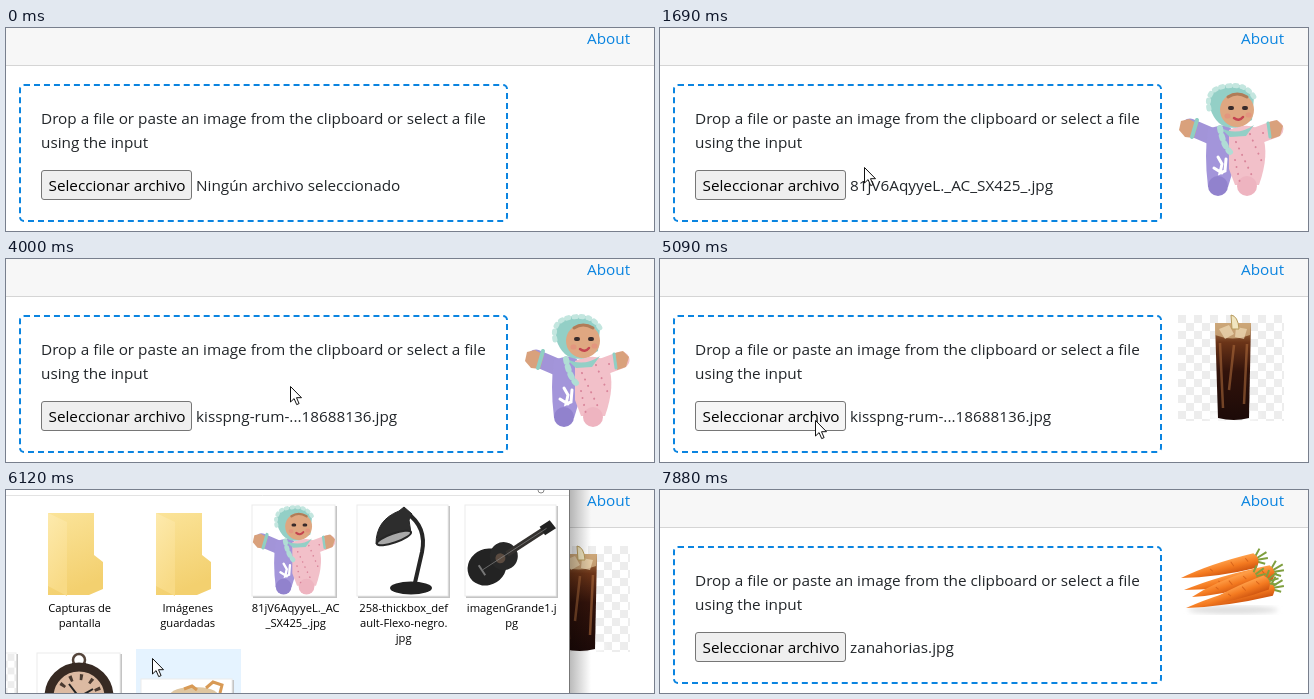
Recreate the animation shown at these times as an HTML page. Size 648x203 px, loop 8600 ms.

```html
<!DOCTYPE html>
<html lang="es">
<head>
<meta charset="utf-8">
<title>File drop</title>
<style>
html, body { margin: 0; width: 100%; height: 100%; overflow: hidden; background: #fff; }
header { position: absolute; width: 648px; height: 37px; background: #f7f7f7; border-bottom: 1px solid #d5d5d5; }
#zone { position: absolute; left: 13px; top: 56px; width: 485px; height: 134px; border: 2px dashed #0a84e0; border-radius: 5px; }
svg { position: absolute; left: 0; top: 0; }
text { font-family: "Open Sans", "Noto Sans", sans-serif; font-size: 15.3px; fill: #212529; white-space: pre; }
.small text { font-size: 11.2px; fill: #000; text-anchor: middle; }
</style>
</head>
<body>
<header></header>
<div id="zone"></div>
<svg width="648" height="203" viewBox="0 0 648 203">
  <defs>
    <pattern id="check" width="16" height="16" patternUnits="userSpaceOnUse">
      <path d="M0 0h16v16H0z" fill="#fff"/><path d="M0 0h8v8H0zM8 8h8v8H8z" fill="#ededed"/>
    </pattern>
    <linearGradient id="cola" x2="0" y2="1">
      <stop stop-color="#b98a55"/><stop offset=".2" stop-color="#6b3418"/>
      <stop offset=".5" stop-color="#32130b"/><stop offset="1" stop-color="#1c0a08"/>
    </linearGradient>
    <linearGradient id="root" x2="0" y2="1">
      <stop stop-color="#ffa04a"/><stop offset=".5" stop-color="#f47a20"/><stop offset="1" stop-color="#cf5510"/>
    </linearGradient>
    <linearGradient id="paper" x2=".3" y2="1"><stop stop-color="#fbe49a"/><stop offset="1" stop-color="#f3d06f"/></linearGradient>
    <linearGradient id="flap" x2=".3" y2="1"><stop stop-color="#fdeaad"/><stop offset="1" stop-color="#f8da85"/></linearGradient>
    <linearGradient id="shade"><stop stop-color="#000" stop-opacity=".28"/><stop offset="1" stop-color="#000" stop-opacity="0"/></linearGradient>
    <filter id="soft"><feGaussianBlur stdDeviation="2.5"/></filter>

    <g id="doll" stroke-linecap="round" fill="none">
      <path d="M97 45L78 52" stroke="#f2c0c9" stroke-width="17"/>
      <path d="M12 43L40 55" stroke="#a294d8" stroke-width="17"/>
      <path d="M3 37l8-2 9 5-4 14-9-1-6-7z" fill="#d9a17c"/>
      <path d="M19 36l-5 17" stroke="#8fcfc4" stroke-width="4"/>
      <path d="M91 38l8-2 6 6-3 10-9 3z" fill="#d9a17c"/>
      <path d="M90 39l2 14" stroke="#8fcfc4" stroke-width="3"/>
      <path d="M30 45Q53 36 56 50L54 90 50 103H30Q26 70 30 45z" fill="#a395da"/>
      <path d="M51 46Q75 36 84 50 92 70 81 101H57L51 85z" fill="#f2c0c9"/>
      <circle cx="40" cy="102" r="10" fill="#9182cd"/>
      <circle cx="69" cy="102" r="10" fill="#eeb4c0"/>
      <path d="M58 58L76 96M72 50L84 78M57 76L62 99M85 49l5 1" stroke="#d9849a" stroke-width="2" stroke-dasharray=".1 7"/>
      <path d="M40 73l4 7-2 9 5-2 1-12M36 84l8 5" stroke="#fff" stroke-width="3"/>
      <path d="M32 24Q28 4 49 1 69-2 76 13L74 36 61 43Q40 48 32 24z" fill="#93cfc6"/>
      <path d="M31 25Q27 4 49 2 68-1 76 13" stroke="#c3e6df" stroke-width="5" stroke-dasharray="2 5"/>
      <path d="M41 43Q59 53 76 41L68 52 52 53z" fill="#93cfc6"/>
      <path d="M42 44Q45 61 52 68" stroke="#b0ddd5" stroke-width="6" stroke-dasharray="3 5"/>
      <ellipse cx="59" cy="26" rx="17" ry="17" fill="#dfa781"/>
      <path d="M50 13q9-6 19 0" stroke="#b07c58" stroke-width="3"/>
      <path d="M52 24h2M66 24h2" stroke="#382b2b" stroke-width="4"/>
      <path d="M56 34q5 4 9-1" stroke="#c44450" stroke-width="2.5"/>
      <path d="M49 32h1M70 31h1" stroke="#e3967e" stroke-width="5"/>
    </g>

    <g id="rum">
      <path d="M0 0h106v106H0z" fill="url(#check)"/>
      <ellipse cx="55" cy="101" rx="26" ry="5" fill="#fff" filter="url(#soft)"/>
      <path d="M37 8h36l-2 95q-15 4-31 0z" fill="url(#cola)"/>
      <path d="M37 8h36l-1 12q-17 7-35 0z" fill="#d3b083" opacity=".8"/>
      <path d="M41 14l10-4 5 9-9 5zM58 12l11 2-3 10-9-2z" fill="#f0dcb8" opacity=".7"/>
      <path d="M53 0q7 1 8 14h-7z" fill="#f1e6c0" stroke="#b79b5c"/>
      <path d="M42 28l3 65M69 29l-3 60M56 30l-5 45" stroke="#a9683a" stroke-width="2.5" opacity=".6"/>
    </g>

    <g id="carrots"><ellipse cx="55" cy="64" rx="45" ry="4" fill="#ddd" filter="url(#soft)"/></g>

    <g id="folder">
      <path d="M0 0h46v42l9 7v27l-14 6H0z" fill="url(#paper)"/>
      <path d="M0 0l19 9v74L0 73z" fill="url(#flap)"/>
    </g>

    <g id="lamp" fill="none" stroke="#262626">
      <path d="M50 8Q70 22 65 47L57 82" stroke-width="4"/>
      <ellipse cx="54" cy="83" rx="21" ry="6.5" fill="#222" stroke="none"/>
      <path d="M19 39Q19 15 42 6l5-4 8 7-3 6 2 13z" fill="#2d2d2d"/>
      <ellipse cx="37" cy="33" rx="18" ry="4.500" transform="rotate(-19 37 33)" fill="#a8a8a8" stroke-width="2"/>
    </g>

    <g id="guitar" transform="translate(22 62) rotate(-33)">
      <ellipse rx="20" ry="18" fill="#232323"/><ellipse cx="20" rx="14" ry="14" fill="#282828"/>
      <path d="M24-3h48v6H24z" fill="#33302e"/><path d="M66-5h12l1 10H66z" fill="#222"/>
      <circle cx="16" r="5" fill="#5b4b40"/><path d="M-6-6v12" stroke="#777" stroke-width="2"/>
      <path d="M-5 0h76" stroke="#8a8a8a" stroke-width=".6"/>
    </g>

    <g id="clock">
      <circle cx="46" cy="7" r="6" fill="none" stroke="#55453b" stroke-width="2.500"/>
      <path d="M39 10h14v8H39z" fill="#2f2622"/>
      <circle cx="46" cy="44" r="30" fill="#dcbaa2" stroke="#372a23" stroke-width="9"/>
      <circle cx="46" cy="44" r="20" fill="none" stroke="#4a3a30" stroke-width="6" stroke-dasharray="3 7.500"/>
      <path d="M46 44L36 31M46 44l14-8" stroke="#222" stroke-width="2"/>
    </g>
  </defs>

  <text x="581" y="16" style="fill:#0a84e0">About</text>
  <text x="35" y="96">Drop a file or paste an image from the clipboard or select a file</text>
  <text x="35" y="120">using the input</text>
  <rect id="button" x="35.500" y="142.500" width="150" height="29" rx="2.500" stroke="#767676"/>
  <text x="42.500" y="163" style="fill:#000">Seleccionar archivo</text>
  <text id="file" x="190" y="163"></text>
  <use id="pic" x="518" y="56"/>

  <g id="dialog" class="small">
    <path d="M563-20h22v260h-22z" fill="url(#shade)"/>
    <path d="M-40-20H563V240H-40z" fill="#fff"/>
    <path d="M563.500-20V240" stroke="#777"/>
    <path d="M0 5.500H563" stroke="#e3e3e3"/>
    <circle cx="535" cy="0" r="3" fill="none" stroke="#888"/>
    <path id="hover" d="M0 159h105v70H0z"/>
    <use href="#folder" x="42" y="23"/>
    <use href="#folder" x="150" y="23"/>
    <g id="thumbs"></g>
    <use href="#doll" transform="translate(246 16) scale(.79)"/>
    <use href="#lamp" x="351" y="15"/>
    <use href="#guitar" x="459" y="15"/>
    <use href="#clock" x="27" y="163"/>
    <ellipse cx="188" cy="205" rx="24" ry="8" fill="#dfc6a0"/>
    <path d="M178 199l8-3 5 4M200 198l7-6 9 3-2 8" fill="none" stroke="#d89a55" stroke-width="3"/>
    <use href="#rum" transform="translate(-80 164) scale(.85)"/>
  </g>

  <g id="ghost" class="small">
    <rect x="-46" y="-85" width="104" height="104" rx="3" fill="#9fb9c4" opacity=".5" filter="url(#soft)"/>
    <g opacity=".86">
      <rect x="-48" y="-87" width="103" height="103" rx="2" fill="#eaf5fa" stroke="#d4e8f1"/>
      <rect x="-40" y="-83" width="86" height="93" fill="#fff" stroke="#dfe8ec"/>
      <use id="cargo"/>
    </g>
    <path id="star" d="M0-10l3 6 8 0-5 7 2 8-8-3-8 3 1-8-5-6 8-1z" fill="#f2d84e"/>
    <g id="tip">
      <path d="M15.500 18.500h61v19h-61z" fill="#fff" stroke="#767676"/>
      <path d="M20 28h10M25 23v10" stroke="#0b4fb3" stroke-width="2"/>
      <text x="52" y="32" style="fill:#0b4fb3">Copiar</text>
    </g>
  </g>
  <path id="cursor" d="M.5.5v15.500l3.600-3.400 2.600 6 2.400-1-2.600-5.900h5z" fill="#fff" stroke="#111"/>
</svg>
<script>
const $ = id => document.getElementById(id);
const NS = "http://www.w3.org/2000/svg";

function add(parent, tag, attrs, text = "") {
  const el = parent.appendChild(document.createElementNS(NS, tag));
  for (const key in attrs) el.setAttribute(key, attrs[key]);
  el.textContent = text;
  return el;
}

// File names, centred below each icon
["Capturas de|pantalla", "Imágenes|guardadas", "81jV6AqyyeL._AC|_SX425_.jpg",
 "258-thickbox_def|ault-Flexo-negro.|jpg", "imagenGrande1.j|pg"]
  .forEach((label, col) => label.split("|").forEach((line, row) =>
    add($("dialog"), "text", { x: 73.7 + 108 * col, y: 122 + 15 * row }, line)));

// White thumbnails with a thin shadow: x, y, width
[[246, 15, 83], [351, 15, 91], [459, 15, 91], [31, 163, 83], [135, 189, 91], [-80, 163, 90]].forEach(([x, y, width]) => {
  add($("thumbs"), "rect", { x: x + 1, y: y + 1, width: width + 1, height: 92, fill: "#c4c4c4" });
  add($("thumbs"), "rect", { x, y, width, height: 91, fill: "#fff", stroke: "#ececec" });
});

// Carrots: head point and tip point
[[77, 14, 3, 32], [93, 26, 6, 44], [75, 31, 14, 51], [93, 42, 8, 62], [88, 36, 26, 59]].forEach(([x, y, tx, ty]) => {
  const angle = Math.atan2(ty - y, tx - x) * 180 / Math.PI - 180;
  const len = Math.hypot(tx - x, ty - y);
  const g = add($("carrots"), "g", { transform: `translate(${x} ${y}) rotate(${angle})` });
  add(g, "path", { d: "M-2 0L13-5M-2 0l15 1M-2 0l11 6M-2 0l9-10", stroke: "#7f9f3f", "stroke-width": 2 });
  add(g, "path", { d: `M0-7Q7 0 0 8Q${-len * .55} 8 ${-len} 0Q${-len * .6}-7 0-7z`, fill: "url(#root)" });
  add(g, "path", { d: `M-9-4l2 4M-24-4l2 5M${-len * .6}-2l2 3`, stroke: "#d9641a", fill: "none" });
});

const LOOP = 8600, STEP = 70;
const NO_FILE = "Ningún archivo seleccionado";
const FILES = [[0, NO_FILE], [1620, "81jV6AqyyeL._AC_SX425_.jpg"], [4000, "kisspng-rum-...18688136.jpg"],
  [5160, NO_FILE], [7750, "zanahorias.jpg"]];
const PICS = [[0, "none"], [1690, "doll"], [4070, "rum"], [7880, "carrots"]];

const current = (list, t) => list.filter(([start]) => start <= t).pop()[1];
const stepped = (t, start, n) => Math.max(0, Math.min(n, Math.floor((t - start) / STEP) + 1)) / n;
const easeOut = (p, power = 2) => 1 - (1 - p) ** power;
const mix = (a, b, p) => a.map((v, i) => v + (b[i] - v) * p);
const show = (id, on) => $(id).style.display = on ? "" : "none";

function pointer(t) {
  if (t < 930) return null;
  if (t < 2220) return mix([375, 334], [204, 139], easeOut(stepped(t, 930, 7)));
  if (t < 2430) return mix([204, 139], [187, 147], stepped(t, 2220, 4));
  if (t < 3380) return null;
  if (t < 4330) return mix([521, 327], [284, 127], easeOut(stepped(t, 3380, 7)));
  if (t < 6120) return mix([284, 127], [155, 161], easeOut(stepped(t, 4330, 8)));
  if (t < 6680) return mix([155, 161], [85, 215], stepped(t, 6120, 8));
  return null;
}

function draw(t) {
  const at = pointer(t);
  const second = t >= 3380;
  const drag = at && (t < 1620 || second && t < 4000);
  const inside = drag && at[1] < 194;

  $("zone").style.borderStyle = inside ? "solid" : "dashed";
  $("file").textContent = current(FILES, t);
  $("pic").setAttribute("href", "#" + current(PICS, t));
  $("button").setAttribute("fill", inside || t >= 5090 && t < 5230 ? "#f5f5f5" : "#efefef");

  show("cursor", at);
  show("ghost", drag);
  if (at) {
    const move = `translate(${at.map(Math.round)})`;
    $("cursor").setAttribute("transform", move);
    $("ghost").setAttribute("transform", move);
  }
  $("cargo").setAttribute("href", second ? "#rum" : "#doll");
  $("cargo").setAttribute("transform", "translate(-39 -82) scale(.8)");
  show("star", !second);
  show("tip", inside);

  const open = t < 7540 ? easeOut(stepped(t, 5500, 6), 1.5) : 1 - stepped(t, 7540, 4);
  show("dialog", open > 0);
  $("dialog").setAttribute("opacity", open);
  $("dialog").setAttribute("transform", `translate(50 190) scale(${.96 + .04 * open}) translate(-50 -190)`);
  const onClock = !at || at[0] < 126;
  $("hover").setAttribute("transform", `translate(${onClock ? 21 : 130})`);
  $("hover").setAttribute("fill", onClock && t < 6940 ? "#d9edff" : "#e5f3ff");
}

function tick() {
  draw(performance.now() % LOOP);
  requestAnimationFrame(tick);
}
tick();
</script>
</body>
</html>
```
